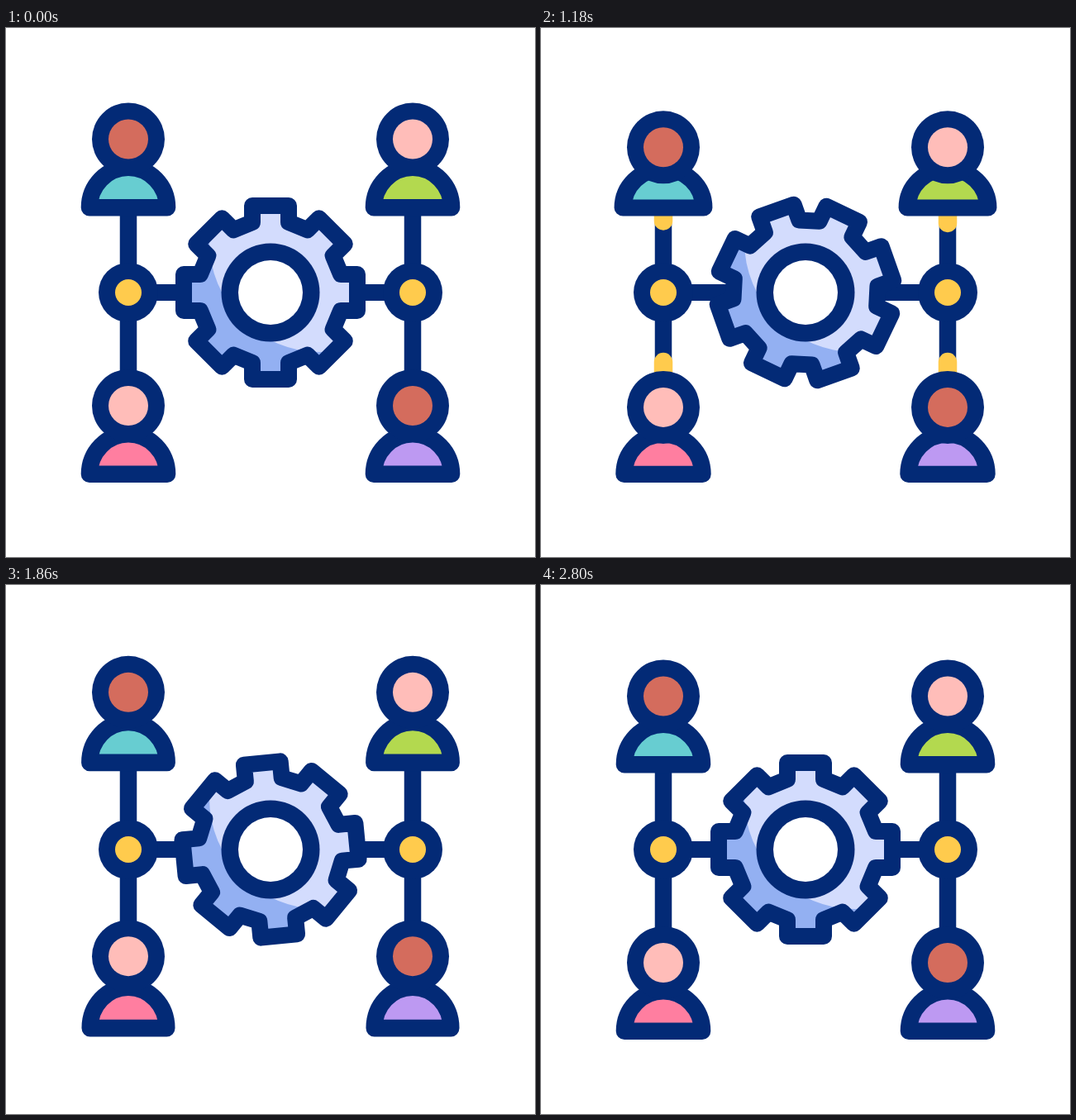
Recreate the animation shown at these times as an HTML page with a canvas. Size 640x640 px, loop 3 s.

```html
<!DOCTYPE html>
<html lang="en">
<head>
<meta charset="utf-8">
<title>Team workflow</title>
<style>
html, body { margin: 0; width: 100%; height: 100%; overflow: hidden; background: #fff; }
canvas { display: block; width: 640px; height: 640px; }
</style>
</head>
<body>
<canvas id="stage" width="640" height="640"></canvas>
<script>
const ctx = document.getElementById('stage').getContext('2d');
const LOOP = 3000, STEP = 20, TAU = Math.PI * 2;
const NAVY = '#032a76', YELLOW = '#ffcb4d', LIGHT = '#d3dcfd', SHADE = '#93b0f2';
const DARK_SKIN = '#d46c5d', PALE_SKIN = '#ffbdb9';
const MID = 320, LEFT = 148, RIGHT = 492;

const people = [
  { x: LEFT, y: 0, skin: DARK_SKIN, shirt: '#67cdd1', delay: 0 },
  { x: RIGHT, y: 0, skin: PALE_SKIN, shirt: '#b3d94f', delay: 0 },
  { x: LEFT, y: 322.5, skin: PALE_SKIN, shirt: '#ff7ea0', delay: 90 },
  { x: RIGHT, y: 322.5, skin: DARK_SKIN, shirt: '#bd99f2', delay: 90 }
];

// time, body lift, body scale x, y, head shift, head scale x, y
const HOP = [
  [1040, 0, 1, 1, 0, 1, 1],
  [1250, 0, 1.05, 0.97, 13.2, 1, 1],
  [1430, -15.5, 0.94, 1.045, -26, 0.965, 1.03],
  [1610, 0, 1.005, 0.96, 9, 0.985, 0.95],
  [1660, 0, 1.035, 0.96, 9, 1, 0.98],
  [1800, -4, 0.98, 1.03, -10, 1, 1],
  [1930, 0, 1.01, 0.99, 2, 1, 1],
  [2040, 0, 1, 1, 0, 1, 1]
];

// time, degrees: a long turn that overshoots, then settles
const SPIN = [[0, 0], [2180, 321], [2800, 315]];

// distance of the pulse's front and back along its wire
const REACH = 82, WIRE = 185;
const FRONT = [[540, 0], [1045, WIRE]];
const BACK = [[775, 0], [1280, WIRE]];

// cubic-bezier(x1, 0, x2, 1)
function bezier(x1, x2) {
  return u => {
    let lo = 0, hi = 1, p = u;
    for (let i = 0; i < 24; i++) {
      const q = 1 - p;
      const x = 3 * x1 * p * q * q + 3 * x2 * p * p * q + p * p * p;
      if (x < u) lo = p; else hi = p;
      p = (lo + hi) / 2;
    }
    return p * p * (3 - 2 * p);
  };
}
const smooth = u => u * u * (3 - 2 * u);
const spinEase = bezier(0.33, 0.545);

function sample(keys, t, ease = smooth) {
  if (t <= keys[0][0]) return keys[0].slice(1);
  for (let i = 1; i < keys.length; i++) {
    const a = keys[i - 1], b = keys[i];
    if (t < b[0]) {
      const e = ease((t - a[0]) / (b[0] - a[0]));
      return a.slice(1).map((v, k) => v + (b[k + 1] - v) * e);
    }
  }
  return keys[keys.length - 1].slice(1);
}

function disc(x, y, r, fill) {
  ctx.beginPath();
  ctx.arc(x, y, r, 0, TAU);
  ctx.fillStyle = fill;
  ctx.fill();
}

function line(points, color, width, cap) {
  ctx.beginPath();
  points.forEach(p => ctx.lineTo(p[0], p[1]));
  ctx.strokeStyle = color;
  ctx.lineWidth = width;
  ctx.lineCap = cap;
  ctx.stroke();
}

function drawWires() {
  line([[LEFT, MID], [RIGHT, MID]], NAVY, 20, 'butt');
  for (const x of [LEFT, RIGHT]) line([[x, 200], [x, 440]], NAVY, 20.5, 'butt');
}

function drawPulse(t, x, dir) {
  const lead = x === LEFT && dir < 0 ? 2.5 : 0;
  const front = sample(FRONT, t)[0], back = sample(BACK, t)[0];
  if (front - back < 0.01) return;
  const side = x < MID ? 1 : -1;
  const at = d => d < REACH
    ? [x + side * (REACH - d), MID]
    : [x, MID + dir * (d - REACH + lead)];
  const points = [at(back)];
  if (back < REACH && front > REACH) points.push([x, MID]);
  points.push(at(front));
  line(points, YELLOW, 22.5, 'round');
}

function drawGear(t) {
  const turn = sample(SPIN, t, spinEase)[0] * Math.PI / 180;
  const gear = new Path2D();
  for (let i = 0; i < 8; i++) {
    const a = turn + i * TAU / 8, c = Math.cos(a), s = Math.sin(a);
    for (const [x, y] of [[-22, -85], [-22, -105], [22, -105], [22, -85]]) {
      gear.lineTo(MID + x * c - y * s, MID + x * s + y * c);
    }
  }
  gear.closePath();
  ctx.fillStyle = SHADE;
  ctx.fill(gear);
  ctx.save();
  ctx.clip(gear);
  disc(380, 258, 134, LIGHT);
  ctx.restore();
  ctx.strokeStyle = NAVY;
  ctx.lineWidth = 20;
  ctx.stroke(gear);
  disc(MID, MID, 59.5, NAVY);
  disc(MID, MID, 39, '#fff');
}

function drawPerson(p, t) {
  const [lift, sx, sy, shift, hx, hy] = sample(HOP, t - p.delay);

  ctx.save();
  ctx.translate(p.x, p.y + 227.5 + lift);
  ctx.scale(sx, sy);
  ctx.beginPath();
  ctx.ellipse(0, -10.2, 47.1, 48.4, 0, Math.PI, TAU);
  ctx.closePath();
  ctx.fillStyle = p.shirt;
  ctx.fill();
  ctx.strokeStyle = NAVY;
  ctx.lineWidth = 20.4;
  ctx.stroke();
  ctx.restore();

  ctx.save();
  ctx.translate(p.x, p.y + 134.5 + shift);
  ctx.scale(hx, hy);
  disc(0, 0, 44, NAVY);
  disc(0, 0, 24, p.skin);
  ctx.restore();
}

function draw(t) {
  ctx.fillStyle = '#fff';
  ctx.fillRect(0, 0, 640, 640);
  ctx.lineJoin = 'round';
  drawWires();
  for (const x of [LEFT, RIGHT]) {
    drawPulse(t, x, -1);
    drawPulse(t, x, 1);
    disc(x, MID, 36, NAVY);
    disc(x, MID, 16, YELLOW);
  }
  drawGear(t);
  people.forEach(p => drawPerson(p, t));
}

const start = performance.now();
function tick() {
  const t = (performance.now() - start) % LOOP;
  draw(Math.floor(t / STEP) * STEP);
  requestAnimationFrame(tick);
}
tick();
</script>
</body>
</html>
```
